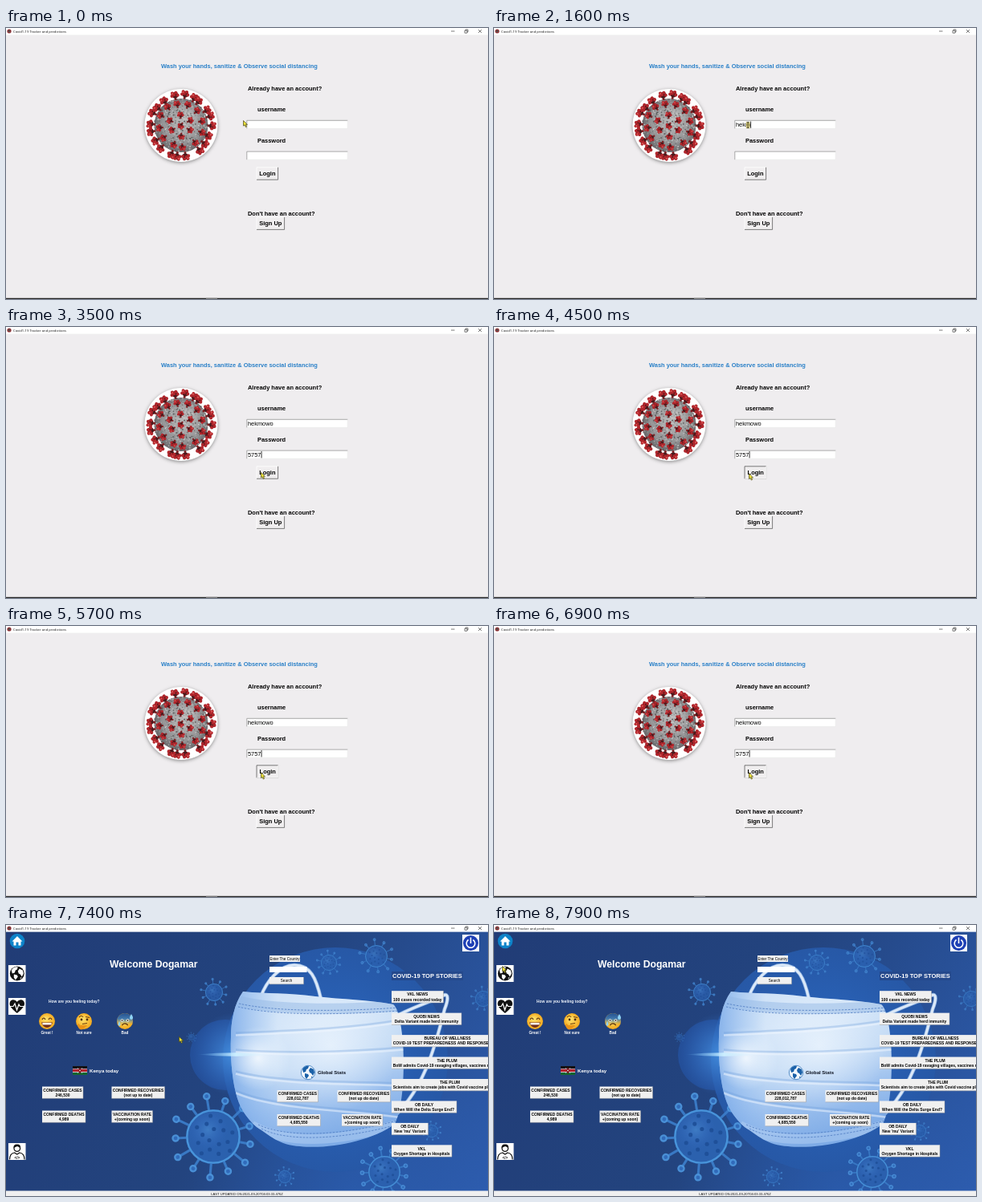
Write an HTML page with a canvas that moves like this. It is 600x338 px and loops after 8 s.

```html
<!DOCTYPE html>
<html lang="en">
<head>
<meta charset="utf-8">
<title>Tracker</title>
<style>
html, body { margin: 0; height: 100%; overflow: hidden; background: #efedef; }
canvas { display: block; width: 100vw; height: 100vh; }
</style>
</head>
<body>
<canvas id="stage"></canvas>
<script>
const W = 600, H = 338, LOOP = 8000, TAU = Math.PI * 2;
const scale = window.devicePixelRatio || 1;
const SANS = '"Liberation Sans", Arial, sans-serif';
let g;

function setup(canvas) {
  canvas.width = W * scale;
  canvas.height = H * scale;
  const ctx = canvas.getContext('2d');
  ctx.scale(scale, scale);
  return ctx;
}
function layer(draw) {
  const canvas = document.createElement('canvas');
  g = setup(canvas);
  draw();
  return canvas;
}
function seeded(seed) {
  return () => (seed = (seed * 16807) % 2147483647) / 2147483647;
}

// Drawing helpers
function box(x, y, w, h, color) {
  g.fillStyle = color;
  g.fillRect(x, y, w, h);
}
function disc(x, y, r, color) {
  g.fillStyle = color;
  g.beginPath();
  g.arc(x, y, r, 0, TAU);
  g.fill();
}
function ring(x, y, r, color, width, from = 0, to = TAU) {
  g.strokeStyle = color;
  g.lineWidth = width;
  g.beginPath();
  g.arc(x, y, r, from, to);
  g.stroke();
}
function shape(d, color) {
  g.fillStyle = color;
  g.fill(new Path2D(d));
}
function line(d, color, width) {
  g.strokeStyle = color;
  g.lineWidth = width;
  g.stroke(new Path2D(d));
}
function ramp(x0, y0, x1, y1, ...colors) {
  const fill = g.createLinearGradient(x0, y0, x1, y1);
  colors.forEach((color, i) => fill.addColorStop(i / (colors.length - 1), color));
  return fill;
}
function glow(x, y, r, color, clear) {
  const fill = g.createRadialGradient(x, y, 0, x, y, r);
  fill.addColorStop(0, color);
  fill.addColorStop(1, clear);
  disc(x, y, r, fill);
}
function text(str, x, y, size, color = '#000', weight = 'bold', align = 'left', family = SANS) {
  g.font = `${weight} ${size}px ${family}`;
  g.textAlign = align;
  g.fillStyle = color;
  g.fillText(str, x, y);
}
function at(x, y, draw, angle = 0) {
  g.save();
  g.translate(x, y);
  g.rotate(angle);
  draw();
  g.restore();
}

function titleBar() {
  box(0, 0, W, 8.6, '#fff');
  disc(4, 4, 2.6, '#8d3134');
  disc(4, 4, 1.3, '#55504f');
  text('Covid1-19 Tracker and predictions', 9, 5.7, 4.2, '#111', 'normal', 'left', '"Open Sans", sans-serif');
  line('M554 4h4.5 M571 3.2h3v3h-3z M572 3v-1h3v3h-1 M588 2l4 4m0-4l-4 4', '#222', .6);
}

// Login page
function entry(y) {
  box(299.6, y, 125.8, 10.6, '#fff');
  line(`M299.8 ${y + 10.4}V${y + .3}H425.3`, '#858585', .7);
  line(`M300 ${y + 10.4}H425.2V${y}`, '#dedede', .5);
}
function button(label, x, y, w, h, pressed) {
  box(x, y, w, h, '#f0eeef');
  const right = x + w, bottom = y + h;
  line(`M${x} ${bottom}V${y}H${right}`, pressed ? '#555' : '#fff', .8);
  line(`M${x} ${bottom}H${right}V${y}`, pressed ? '#fff' : '#5e5e5e', .8);
  const shift = pressed ? .4 : 0;
  text(label, x + 3.2 + shift, y + 10.2 + shift, 7.45);
}
function spike(x, y, angle, size) {
  at(x, y, () => {
    line(`M${-size * 1.4} 0H0`, '#7c2023', size * .6);
    disc(0, .5, size * .85, '#4a1a1d');
    for (const [dx, dy] of [[-.1, -.8], [.65, -.55], [.6, .45], [-.15, .8], [.2, -.05]])
      disc(dx * size, dy * size, size * .46, '#b0262c');
    disc(size * .5, -size * .55, size * .24, '#dc5453');
    disc(size * .1, size * .35, size * .2, '#5c1b1e');
  }, angle);
}
function virusBall() {
  const cx = 218, cy = 121.5, rand = seeded(91);
  g.save();
  g.shadowColor = 'rgba(60,60,60,.55)';
  g.shadowBlur = 4 * scale;
  g.shadowOffsetY = 1.2 * scale;
  disc(cx, cy, 45.5, '#fff');
  g.restore();
  const ball = g.createRadialGradient(cx + 6, cy - 10, 4, cx, cy, 35);
  ball.addColorStop(0, '#bdbdbd');
  ball.addColorStop(.7, '#929294');
  ball.addColorStop(1, '#606063');
  disc(cx, cy, 33.5, ball);
  for (let i = 0; i < 750; i++) {
    const a = rand() * TAU, r = Math.sqrt(rand()) * 33.5, v = Math.round(80 + rand() * 130);
    disc(cx + r * Math.cos(a), cy + r * Math.sin(a), .4 + rand() * .6, `rgb(${v},${v},${v})`);
  }
  for (const [count, radius, size] of [[20, 38, 4.5], [12, 27.5, 3.7], [6, 14, 3.5], [1, 2, 3.5]])
    for (let i = 0; i < count; i++) {
      const a = i / count * TAU + radius + rand() * .2, r = radius + rand() * 3 - 1.5;
      spike(cx + r * Math.cos(a), cy + r * Math.sin(a), a, size);
    }
}
function loginPage() {
  box(0, 0, W, H, '#efedef');
  titleBar();
  box(0, 336.8, W, 1.2, '#252525');
  box(249, 336.8, 14, 1.2, '#777');
  text('Wash your hands, sanitize & Observe social distancing', 193, 50, 7.45, '#2a80c8');
  text('Already have an account?', 301, 77.7, 7.45);
  text('username', 313, 104, 7.45);
  text('Password', 313, 142.8, 7.45);
  text("Don't have an account?", 301, 234, 7.45);
  entry(115);
  entry(153.8);
  button('Login', 312, 173.8, 26.6, 15.4);
  button('Sign Up', 312, 236, 34.6, 15.4);
  virusBall();
}

// Dashboard
function paleVirus(x, y, r, alpha) {
  g.save();
  g.globalAlpha = alpha;
  const count = r > 15 ? 13 : 10;
  for (let i = 0; i < count; i++)
    at(x, y, () => {
      const reach = r * (i % 2 ? 1.5 : 1.38);
      line(`M${r * .95} 0H${reach}`, '#3b7cc8', r * .09);
      disc(reach, 0, r * .14, '#4c93da');
      disc(reach, 0, r * .07, '#2f68b8');
    }, i / count * TAU + .2);
  disc(x, y, r, '#2c62b0');
  glow(x - r * .2, y - r * .25, r * .75, 'rgba(70,135,205,.75)', 'rgba(50,100,190,0)');
  ring(x, y, r * .96, '#4a97dd', r * .07);
  for (let i = 1; i < 17; i++) {
    const d = r * .82 * Math.sqrt(i / 17), a = i * 2.4;
    disc(x + d * Math.cos(a), y + d * Math.sin(a), r * .075, '#1f4f98');
  }
  g.restore();
}
function backdrop() {
  box(0, 0, W, H, ramp(0, 0, W, H, '#213c76', '#23447f', '#2d5cae'));
  glow(430, 330, 200, 'rgba(42,96,182,.55)', 'rgba(42,96,182,0)');
  disc(273, 162, 44, 'rgba(38,84,166,.7)');
  disc(410, 168, 140, '#26559f');
  glow(410, 168, 140, 'rgba(46,112,205,.9)', 'rgba(40,94,180,.35)');
  glow(284, 161, 52, 'rgba(80,165,245,.7)', 'rgba(60,130,225,0)');
  for (const [x, y, r, a] of [[258, 264, 34, .95], [259, 84, 11, .75], [231, 140, 4, .5], [402, 47, 10, .7],
    [461, 39, 14, .7], [471, 308, 20, .85], [530, 257, 8, .7], [594, 92, 10, .6], [347, 314, 8, .7]])
    paleVirus(x, y, r, a);
}
function strap(d) {
  line(d, '#8fb3e2', 4.6);
  line(d, '#dce9f8', 3);
}
function mask() {
  strap('M317 90C324 70 341 50 359 50C379 50 386 66 392 92');
  strap('M478 118C505 102 525 98 544 88C552 84 550 95 546 105C536 145 520 212 474 246');
  const d = 'M295 83C325 86 350 84 385 89C420 93 450 93 482 99C498 112 500 220 484 248C455 270 400 280 366 276C340 275 328 262 312 252C298 240 290 226 286 209C281 190 279 160 280 140C280 120 284 98 295 83Z';
  shape(d, ramp(310, 90, 360, 280, '#cfe2f7', '#d2e4f8', '#c4dbf5', '#9cc0ee', '#7eabe6'));
  g.save();
  g.clip(new Path2D(d));
  box(278, 80, 60, 200, ramp(278, 0, 338, 0, 'rgba(85,145,225,.6)', 'rgba(110,165,235,0)'));
  glow(405, 150, 85, 'rgba(238,246,254,.75)', 'rgba(238,246,254,0)');
  glow(314, 166, 40, 'rgba(248,252,255,.85)', 'rgba(240,248,255,0)');
  for (const y of [126, 154, 190, 222]) {
    const rise = (y - 160) * .25;
    const fold = shift => `M286 ${y - rise + shift}C335 ${y + 6 + shift} 420 ${y + 5 + shift} 495 ${y + rise + shift}`;
    g.globalAlpha = .3;
    line(fold(0), '#6797d6', 2.5);
    g.globalAlpha = .5;
    line(fold(3), '#f2f8ff', 2.5);
  }
  g.globalAlpha = 1;
  line('M291 95C325 104 400 107 490 101', 'rgba(150,186,230,.5)', 13);
  line('M306 250C350 274 410 272 490 248', 'rgba(190,216,246,.4)', 12);
  g.setLineDash([2.5, 1.6]);
  line('M290 98C330 107 400 109 490 103 M289 102C330 112 400 113 490 107 M314 249C350 266 420 263 490 243 M318 254C350 271 420 268 490 248', '#4e7cc2', .8);
  g.restore();
  shape('M238 161.5Q285 157 335 161.5Q285 166 238 161.5Z',
    ramp(238, 0, 335, 0, 'rgba(110,190,250,0)', 'rgba(205,240,255,.95)', 'rgba(230,245,255,0)'));
}
function card(x, y, w, head, body, center = x + w / 2) {
  box(x, y, w, 14.8, '#f0f0f0');
  line(`M${x} ${y + 14.8}h${w}v-14.8`, '#999', .5);
  text(head, center, y + 6.2, 4.95, '#000', 'bold', 'center');
  if (center === x + w / 2) text(body, center, y + 12.3, 4.95, '#000', 'bold', 'center');
  else text(body, x + 1.7, y + 12.3, 4.95);
}
function stats(x, y, x2, x3, cases, recovered, deaths) {
  card(x, y, 51, 'CONFIRMED CASES', cases);
  card(x2, y, 66, 'CONFIRMED RECOVERIES', recovered);
  card(x, y + 30, 54, 'CONFIRMED DEATHS', deaths);
  card(x3, y + 30, 51, 'VACCINATION RATE', '+(coming up soon)');
}
function globe(x, y, r, sea, land) {
  disc(x, y, r, sea);
  at(x, y, () => {
    g.scale(r / 9, r / 9);
    shape('M-7-4Q-4-9 1-8L0-5L-2-4L-3-1L-6 0Z M-4 1L0 2L1 4L-2 8L-4 5Z M3-6L7-4L8 0L6 4L4 1L2 0L1-3Z M4 5L6 5L4 7Z', land);
  });
}
function face(x, mood) {
  at(x, 120, () => {
    const skin = g.createRadialGradient(-2, -3, 1, 0, 0, 10);
    skin.addColorStop(0, '#ffe16a');
    skin.addColorStop(1, '#f3a91e');
    disc(0, 0, 10, skin);
    if (mood === 'great') {
      line('M-6-2Q-4-6-2-2 M2-2Q4-6 6-2', '#5b3410', 1.2);
      shape('M-7 1.5H7Q5 8 0 8Q-5 8-7 1.5Z', '#74301c');
      box(-5.6, 2, 11.2, 2.4, '#fff');
    } else if (mood === 'unsure') {
      disc(-3, -2, 1.4, '#4f300f');
      disc(4, -2, 1.4, '#4f300f');
      line('M-6-5Q-3-8-1-5 M2-5.5L7-4.5 M-2 3.5L4 2.5', '#6b3f10', 1.1);
      shape('M-8 4Q-6 2-5 5L3 5Q5 6 2 7L-1 10Q-7 12-8 4Z', '#e99318');
    } else {
      disc(0, 0, 10, ramp(0, -10, 0, 4, '#24508f', '#4279ad', 'rgba(120,160,170,0)'));
      disc(-3.5, -1, 1.8, '#fff');
      disc(3.5, -1, 1.8, '#fff');
      disc(-3.5, -1, .9, '#3b2a17');
      disc(3.5, -1, .9, '#3b2a17');
      ring(0, 7, 4, '#5b3410', 1.3, Math.PI * 1.15, Math.PI * 1.85);
      shape('M8-9Q12-3 8-2Q4-3 8-9Z M-7 0Q-4 5-7 6Q-10 5-7 0Z', '#8fd3f5');
    }
  });
}
function icons() {
  disc(14, 20, 9.3, '#0d83c9');
  shape('M7.5 20.5L14 14L20.5 20.5H18.5V25.5H15.5V21.5H12.5V25.5H9.5V20.5Z', '#fff');
  box(568, 12, 21, 21, '#f4f6fb');
  disc(578.5, 22.5, 9.5, '#1d3fb5');
  ring(578.5, 23, 5.3, '#fff', 1.6, -Math.PI * .32, Math.PI * 1.32);
  line('M578.5 15.5V23', '#fff', 1.6);
  for (const y of [50, 91, 272]) box(3, y, 21.5, 21, '#fff');
  globe(13.8, 60.5, 9, '#111', '#fff');
  shape('M13.8 110C9 106 4.5 102 4.5 98C4.5 92.5 11 91.5 13.8 96C16.5 91.5 23 92.5 23 98C23 102 18.5 106 13.8 110Z', '#111');
  line('M3.5 101.5H9L11 98L13.5 106L16 99L17.5 101.5H24', '#fff', 1.2);
  ring(13.8, 278.5, 3.8, '#111', 1.3);
  shape('M9.5 278Q9 273.3 13.8 273.5Q18.5 273.3 18 278L14 276Z', '#111');
  line('M4.5 292.5Q4.5 285 10.5 284L13.8 286L17 284Q23 285 23 292.5', '#111', 1.2);
  text('</>', 13.8, 291.5, 4.5, '#111', 'bold', 'center');
}
function dashboard() {
  backdrop();
  mask();
  titleBar();
  icons();

  text('Welcome Dogamar', 129, 53, 12.2, '#fff');
  text('How are you feeling today?', 53, 97, 4.9, '#eef3fb');
  [['great', 'Great !', 51], ['unsure', 'Not sure', 97], ['bad', 'Bad', 148]].forEach(([mood, label, x]) => {
    face(x, mood);
    text(label, x, 136, 4.7, '#fff', 'bold', 'center');
  });

  box(328, 38, 38, 8, '#f0f0f0');
  text('Enter The Country', 347, 43.6, 4.5, '#000', 'normal', 'center');
  box(328, 52, 46.5, 7, '#fff');
  box(328, 65, 42.5, 8.8, '#f0f0f0');
  line('M328 73.8H370.5V65', '#999', .5);
  text('Search', 349, 71, 4.5, '#000', 'normal', 'center');

  ['#111', '#fff', '#b3232d', '#fff', '#14652f'].forEach((color, i) =>
    box(83, 176 + [0, 3, 3.7, 7.3, 8][i], 18, [3, .7, 3.6, .7, 3][i], color));
  line('M89 178L95 185M95 178L89 185', '#fff', .5);
  shape('M92 177.5Q95.5 181.5 92 185.5Q88.5 181.5 92 177.5Z', '#7d1820');
  disc(92, 181.5, .8, '#fff');
  text('Kenya today', 104, 183.5, 6.1, '#fff');
  globe(376, 184, 9, '#f2f7fd', '#1b61a8');
  ring(376, 184, 8.7, '#2b72b9', .8);
  text('Global Stats', 388, 186.2, 6, '#0c1220');

  stats(45, 201.5, 131.5, 131.5, '246,530', '(not up to date)', '4,989');
  stats(337.5, 206, 412.5, 418, '228,012,787', '(not up do date)', '4,685,550');

  box(480, 58, 89, 11, '#25498c');
  text('COVID-19 TOP STORIES', 481, 66.3, 7.5, '#fff');
  [
    ['VKL NEWS', '100 cases recorded today', 64.5],
    ['QUOBI NEWS', 'Delta Variant made herd immunity', 87],
    ['BUREAU OF WELLNESS', 'COVID-19 TEST PREPAREDNESS AND RESPONSE TO DATE', 140, 549.5],
    ['THE PLUM', 'BoW admits Covid-19 ravaging villages, vaccines running low', 140, 549],
    ['THE PLUM', 'Scientists aim to create jobs with Covid vaccine plants', 140, 552.5],
    ['OB DAILY', 'When Will the Delta Surge End?', 81],
    ['OB DAILY', "New 'mu' Variant", 45.5],
    ['VKL', 'Oxygen Shortage in Hospitals', 75]
  ].forEach(([head, body, w, center], i) => card(480, 82.2 + i * 27.45, w, head, body, center));

  box(0, 331.5, W, 6.5, '#f0f0f0');
  text('LAST UPDATED ON:2021-09-20T04:03:33.476Z', 300, 336.6, 4.13, '#111', 'normal', 'center');
}

// Motion: time, x, y of the pointer tip
const PATH = [
  [300, 295.5, 115.5], [850, 316, 121], [3050, 316, 121], [3550, 317.5, 183],
  [3900, 322, 222.5], [4300, 317.5, 183], [7150, 317.5, 183], [7800, 10.5, 51.5]
];
function pointerAt(t) {
  const next = PATH.findIndex(p => p[0] > t);
  if (next === 0) return PATH[0].slice(1);
  if (next < 0) return PATH[PATH.length - 1].slice(1);
  const [t0, x0, y0] = PATH[next - 1], [t1, x1, y1] = PATH[next];
  const p = (t - t0) / (t1 - t0), e = p * p * (3 - 2 * p);
  return [x0 + (x1 - x0) * e, y0 + (y1 - y0) * e];
}
function pointer(t) {
  const [x, y] = pointerAt(t);
  at(x, y, () => {
    if (t < 7000 && x > 303 && y > 115 && y < 126) {
      box(-2, -4, 4.4, 8.2, 'rgba(205,190,75,.7)');
      line('M-1.5-3.6H1.7M.1-3.6V3.6M-1.5 3.6H1.7', '#222', .7);
    } else {
      const arrow = 'M0 0V6.6L1.6 5.3L2.8 8L4 7.4L2.9 4.9H5Z';
      shape(arrow, '#efe43a');
      line(arrow, '#4a4612', .7);
    }
  });
}
function typed(str, t, times) {
  return str.slice(0, times.filter(time => t >= time).length);
}
function field(str, y, active) {
  text(str, 301, y, 7.4, '#000', 'normal');
  if (active) box(301.2 + g.measureText(str).width, y - 6.8, .8, 8.4, '#000');
}

const login = layer(loginPage), board = layer(dashboard);
const screen = setup(document.getElementById('stage'));

function frame(now) {
  const t = now % LOOP;
  g = screen;
  g.drawImage(t < 7000 ? login : board, 0, 0, W, H);
  if (t < 7000) {
    field(typed('hekmowo', t, [1000, 1200, 1400, 1600, 1800, 1950, 2100]), 123.3, t >= 900 && t < 2300);
    field(typed('5757', t, [2500, 2700, 2850, 3000]), 161.8, t >= 2300);
    if (t >= 4400) button('Login', 312, 173.8, 26.6, 15.4, true);
  }
  pointer(t);
  requestAnimationFrame(frame);
}
requestAnimationFrame(frame);
</script>
</body>
</html>
```
